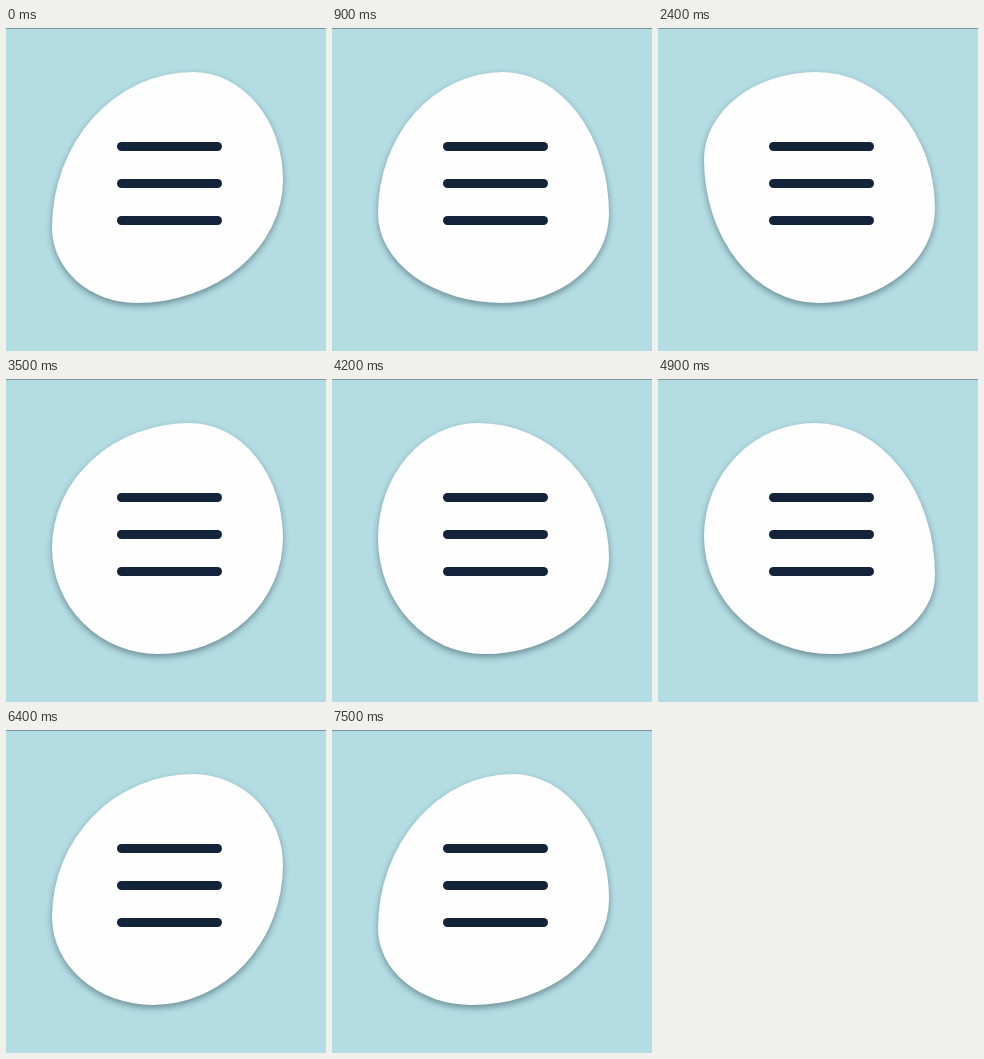
Write an HTML page that moves like this. It is 320x323 px and loops after 7.6 s.

```html
<!DOCTYPE html>
<html lang="en">
<head>
<meta charset="utf-8">
<title>Morphing menu button</title>
<style>
  html, body {
    margin: 0;
    width: 100%;
    height: 100%;
    overflow: hidden;
  }
  body {
    position: relative;
    background: #b3dce3;
  }
  .edge {
    position: absolute;
    inset: 0 0 auto;
    height: 1px;
    background: #7d969d;
  }
  .blob {
    position: absolute;
    left: 46px;
    top: 44px;
    width: 231px;
    height: 231px;
    background: #fefeff;
    box-shadow: 0 3px 6px rgba(15, 35, 45, .42);
    animation: morph 7600ms linear infinite;
  }
  .bar {
    position: absolute;
    left: 110.5px;
    width: 105px;
    height: 9px;
    border-radius: 4.5px;
    background: #13233a;
  }
  .bar:nth-of-type(1) { top: 113.7px; }
  .bar:nth-of-type(2) { top: 150.7px; }
  .bar:nth-of-type(3) { top: 187.6px; }

  /* A 7 s cycle entered at 52% and cut after 7.6 s */
  @keyframes morph {
    0%      { border-radius: 61% 39% 63.6% 36.4% / 67.4% 46.6% 53.4% 32.6%; }
    3.684%  { border-radius: 61% 39% 67% 33% / 70% 50% 50% 30%; }
    16.579% { border-radius: 50% 50% 34% 66% / 56% 68% 32% 44%; }
    29.474% { border-radius: 46% 54% 50% 50% / 35% 61% 39% 65%; }
    44.211% { border-radius: 63% 37% 54% 46% / 55% 48% 52% 45%; }
    57.105% { border-radius: 40% 60% 54% 46% / 49% 60% 40% 51%; }
    70%     { border-radius: 54% 46% 38% 62% / 49% 70% 30% 51%; }
    82.895% { border-radius: 61% 39% 55% 45% / 61% 38% 62% 39%; }
    95.789% { border-radius: 61% 39% 67% 33% / 70% 50% 50% 30%; }
    100%    { border-radius: 57.4% 42.6% 56.2% 43.8% / 65.4% 55.9% 44.1% 34.6%; }
  }
</style>
</head>
<body>
  <div class="edge"></div>
  <div class="blob"></div>
  <span class="bar"></span>
  <span class="bar"></span>
  <span class="bar"></span>
</body>
</html>
```
